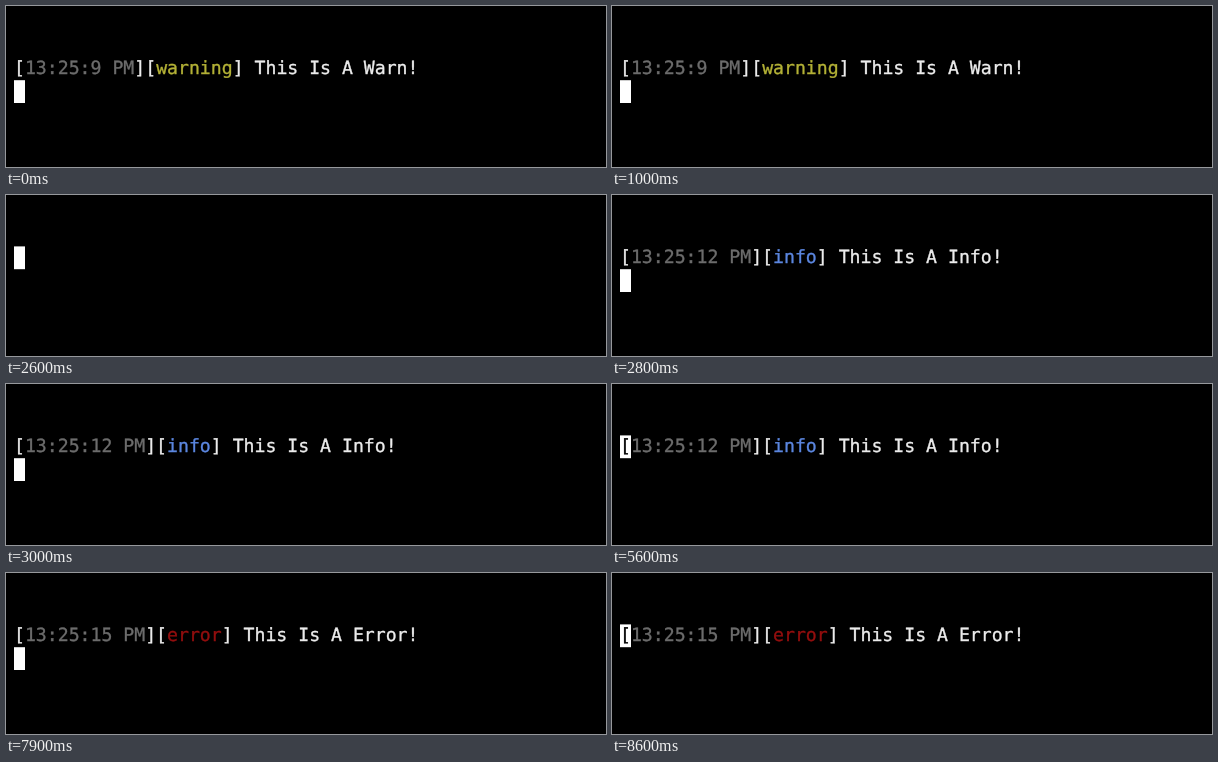
Animation, 600 px wide and 161 px high, one loop 8.7 s. Source, as an HTML page:

```html
<!DOCTYPE html>
<html lang="en">
<head>
<meta charset="utf-8">
<title>Terminal log levels</title>
<style>
  html, body { margin: 0; width: 100%; height: 100%; overflow: hidden; background: #000; }
  svg { display: block; width: 600px; height: 161px; }
  text {
    font: 18.17px "DejaVu Sans Mono", monospace;
    text-rendering: geometricPrecision;
    white-space: pre;
    color: #ececec;
    fill: currentColor;
    stroke: currentColor;
    stroke-width: 0.35px;
  }
  .time { color: #6c6c6c; }
  .warning { color: #b3b136; }
  .info { color: #5b86df; }
  .error { color: #920e0e; }
  .covered { color: #000; }
  .cursor { fill: #fff; }
  #screen { filter: blur(0.55px); }
</style>
</head>
<body>
<svg viewBox="0 0 600 161"><g id="screen"></g></svg>
<script>
const LOOP = 8700;
const LEFT = 8, BASELINE = 68.2;
const CURSOR = { width: 11, height: 22.8, rows: [51.4, 74.2] };
const screenGroup = document.getElementById("screen");

const warning = { time: "13:25:9 PM", level: "warning", message: "This Is A Warn!" };
const info = { time: "13:25:12 PM", level: "info", message: "This Is A Info!" };
const error = { time: "13:25:15 PM", level: "error", message: "This Is A Error!" };

// Each scene: start and end in ms, cursor row, and an optional log entry.
const scenes = [
  [0, 2600, 1, warning],
  [2600, 2800, 0, null],
  [2800, 5600, 1, info],
  [5600, 5700, 0, info],
  [5700, 8600, 1, error],
  [8600, LOOP, 0, error],
];

function add(parent, tag, attributes = {}, content = "") {
  const node = document.createElementNS("http://www.w3.org/2000/svg", tag);
  for (const [name, value] of Object.entries(attributes)) node.setAttribute(name, value);
  node.textContent = content;
  return parent.appendChild(node);
}

function drawScene(row, entry) {
  const group = add(screenGroup, "g", { opacity: 0 });
  add(group, "rect", {
    class: "cursor", x: LEFT, y: CURSOR.rows[row], width: CURSOR.width, height: CURSOR.height,
  });
  if (entry) {
    const line = add(group, "text", { x: LEFT, y: BASELINE });
    const span = (style, content) => add(line, "tspan", { class: style }, content);
    span(row === 0 ? "covered" : "", "[");
    span("time", entry.time);
    span("", "][");
    span(entry.level, entry.level);
    span("", "] " + entry.message);
  }
  return group;
}

function showBetween(group, start, end) {
  const frames = [{ offset: start / LOOP, opacity: 1 }];
  if (start > 0) frames.unshift({ offset: 0, opacity: 0 });
  if (end < LOOP) frames.push({ offset: end / LOOP, opacity: 0 }, { offset: 1, opacity: 0 });
  else frames.push({ offset: 1, opacity: 1 });
  for (const frame of frames) frame.easing = "steps(1, end)";
  group.animate(frames, { duration: LOOP, iterations: Infinity });
}

for (const [start, end, row, entry] of scenes) {
  showBetween(drawScene(row, entry), start, end);
}
</script>
</body>
</html>
```
